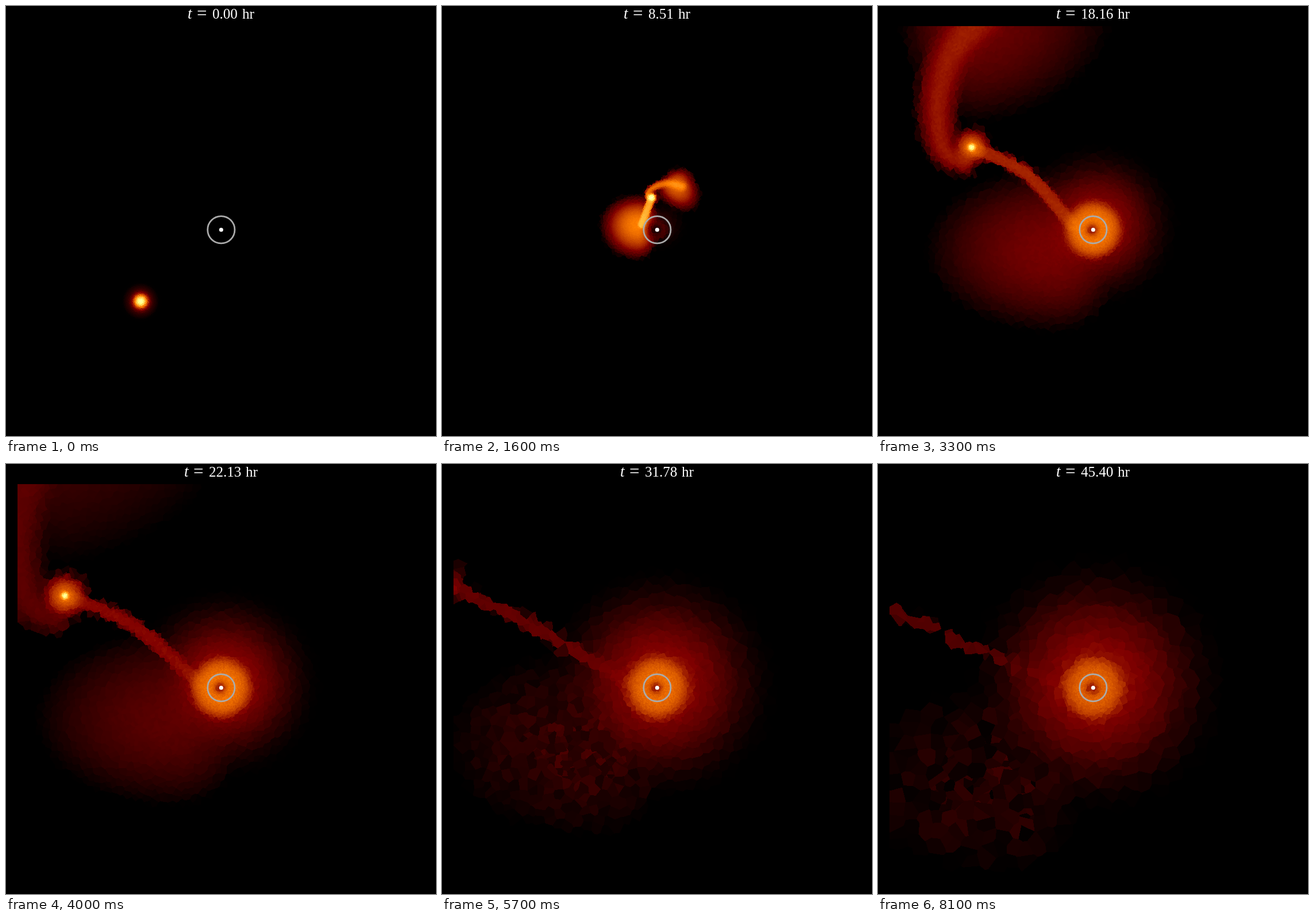
An HTML page with a canvas that plays this animation: 748x748 px, repeating every 8200 ms.

```html
<!DOCTYPE html>
<html>
<head>
<meta charset="utf-8">
<style>
html, body { margin: 0; width: 100%; height: 100%; overflow: hidden; background: #000; }
canvas { display: block; }
</style>
</head>
<body>
<canvas id="stage" width="748" height="748"></canvas>
<script>
const ctx = document.getElementById('stage').getContext('2d');
const SIZE = 708, LEFT = 20, TOP = 35;
const HOLE_X = 374, HOLE_Y = 389, PERI = 23.5;

const mix = (a, b, t) => a + (b - a) * t;
const ramp = (n, from, to) => Math.min(1, Math.max(0, (n - from) / (to - from)));
const decay = (age, span) => Math.exp(-age / span);

let seed = 7;
function random() {
  seed = (Math.imul(seed, 1664525) + 1013904223) >>> 0;
  return seed / 4294967296;
}

// A Voronoi mesh from a jittered grid.
function makeMesh(size) {
  const cols = Math.ceil(SIZE / size), count = cols * cols;
  const x = new Float32Array(count), y = new Float32Array(count), shade = new Float32Array(count);
  for (let i = 0; i < count; i++) {
    x[i] = (i % cols + random()) * size;
    y[i] = (Math.floor(i / cols) + random()) * size;
    shade[i] = random();
  }
  const owner = new Uint32Array(SIZE * SIZE);
  for (let py = 0; py < SIZE; py++) {
    const gy = Math.floor(py / size);
    for (let px = 0; px < SIZE; px++) {
      const gx = Math.floor(px / size);
      let best = Infinity, id = 0;
      for (let j = Math.max(0, gy - 1); j <= gy + 1 && j < cols; j++) {
        for (let i = Math.max(0, gx - 1); i <= gx + 1 && i < cols; i++) {
          const k = j * cols + i, dx = x[k] - px, dy = y[k] - py, d = dx * dx + dy * dy;
          if (d < best) { best = d; id = k; }
        }
      }
      owner[py * SIZE + px] = id;
    }
  }
  return { size, x, y, shade, owner, value: new Float32Array(count) };
}
const meshes = [2, 4, 7, 11, 16, 23].map(makeMesh);

// Parabolic orbit: solve D + D^3 / 3 = M, then add the kick gained near the hole.
function starAt(n) {
  const m = -8.77 + .7346 * n - .002135 * n * n;
  const w = Math.cbrt(1.5 * m + Math.sqrt(2.25 * m * m + 1));
  const d = w - 1 / w;
  return [HOLE_X + PERI * (1 - d * d) - .93 * Math.max(0, n - 15), HOLE_Y - 2 * PERI * d];
}

// Catmull-Rom curve through a few points.
function curve(points) {
  const last = points.length - 1, out = [];
  const get = i => points[Math.min(last, Math.max(0, i))];
  for (let s = 0; s <= last * 4; s++) {
    const i = Math.min(last - 1, Math.floor(s / 4)), t = s / 4 - i;
    out.push([0, 1].map(axis => {
      const [a, b, c, d] = [-1, 0, 1, 2].map(k => get(i + k)[axis]);
      return b + t / 2 * (c - a + t * (2 * a - 5 * b + 4 * c - d + t * (3 * (b - c) + d - a)));
    }));
  }
  return out;
}

// Squared distance to a curve, in units of its local half width, at most 1.
function tubeDistance(x, y, points, w0, w1) {
  let best = 1;
  for (let i = 0; i < points.length - 1; i++) {
    const [ax, ay] = points[i], dx = points[i + 1][0] - ax, dy = points[i + 1][1] - ay;
    const t = Math.min(1, Math.max(0, ((x - ax) * dx + (y - ay) * dy) / (dx * dx + dy * dy + 1e-6)));
    const ex = x - ax - t * dx, ey = y - ay - t * dy;
    const w = mix(w0, w1, (i + t) / (points.length - 1));
    best = Math.min(best, (ex * ex + ey * ey) / (w * w));
  }
  return best;
}

// A soft oval with its own extent to the left, right, top and bottom.
function cloud(dx, dy, l, r, u, d) {
  const a = dx / (dx < 0 ? l : r), b = dy / (dy < 0 ? u : d);
  return Math.max(0, 1 - a * a - b * b);
}

// The tail thrown outwards, in the star's frame; it only turns and grows.
const arm = curve([[-12, 16], [-31, -5], [-28, -55], [-2, -108], [50, -150]]);

// Returns the brightness function of one step.
function makeField(n) {
  const [sx, sy] = starAt(n);
  const age = Math.max(0, n - 15);
  const birth = ramp(n, 10, 15), squeeze = ramp(n, 9, 15), grown = 1 - decay(age, 10);

  const coreR = mix(14, 9, squeeze), glow = mix(.15, .44, squeeze);
  const glowR = mix(32, 14, squeeze) + 42 * (age / 33) ** .75;

  const scale = Math.max(.3, (n - 10) / 14), turn = .5 / scale - .5;
  const cos = Math.cos(turn) / scale, sin = Math.sin(turn) / scale;
  const fade = birth * (1 - ramp(n, 30, 52));
  const armV = .36 * scale ** -.25 * fade, fanV = .28 * scale ** -.45 * fade;

  const debrisX = mix(sx, HOLE_X - 34 - 1.9 * age, birth);
  const debrisY = mix(sy, HOLE_Y - 9 + 2.6 * age, birth);
  const debrisV = birth * (.06 + .44 * decay(age, 18));
  const patch = .9 * ramp(n, 40, 72);

  const haloR = 240 * (1 - decay(Math.max(.1, n - 10), 24)), haloV = .3 * ramp(n, 12, 22);
  const discR = 20 + 50 * grown, discV = ramp(n, 12, 18) * (.5 - .001 * n);
  const young = decay(age, 5), holeR = 10 + 4 * young;
  const depth = ramp(n, 12, 15) * (.4 + .45 * young);

  // Once the star has left, the end of the stream sinks along the border.
  const bend = ramp(n, 12, 24) - ramp(n, 44, 64);
  const from = [Math.max(sx, -10), Math.max(sy, 103 + 1.7 * n)];
  const to = [HOLE_X - 18 - .6 * n, HOLE_Y - 9];
  const middle = [mix(from[0], to[0], .5) + 8 * bend, mix(from[1], to[1], .5) - 22 * bend];
  const stream = curve([n < 48 ? [sx, sy] : from, middle, to]);
  const streamW = mix(9, 17, ramp(n, 15, 24));
  const streamV = ramp(n, 12, 14) * (.15 + .43 * decay(age, 18));
  const grain = .08 * ramp(n, 0, 40);

  return (x, y, shade) => {
    const dx = x - sx, dy = y - sy, hx = x - HOLE_X, hy = y - HOLE_Y;
    const lx = dx * cos + dy * sin, ly = dy * cos - dx * sin;
    const star2 = dx * dx + dy * dy, hole2 = hx * hx + hy * hy;
    let sum = 0;
    const add = v => { sum += v ** 4; };
    add(.82 * Math.exp(-star2 / (coreR * coreR)));
    add(glow * Math.max(0, 1 - star2 / (glowR * glowR)));
    if (fade) {
      add(fanV * cloud(lx - 25, ly + 130, 80, 155, 105, 105));
      add(armV * (1 - tubeDistance(lx, ly, arm, 17, 40)));
    }
    add(debrisV * (1 - patch + 2 * patch * shade) * cloud(x - debrisX, y - debrisY,
      68 + 192 * grown, 42 + 100 * grown, 55 + 110 * grown, 64 + 96 * grown));
    add(haloV * cloud(hx - 6, hy + 8, haloR, haloR, haloR, haloR) ** 2);
    add(discV * Math.max(0, 1 - (hole2 / (discR * discR)) ** 2));
    if (streamV) add(streamV * (1 - tubeDistance(x, y, stream, streamW, streamW) ** 2));
    const hole = depth * Math.exp(-((hx + 2) ** 2 + hy * hy) / (holeR * holeR));
    return Math.sqrt(Math.sqrt(sum)) * (1 - hole) * (1 + grain * (shade - .5));
  };
}

const image = ctx.createImageData(SIZE, SIZE);

function drawGas(n) {
  const field = makeField(n), coarse = 3 + .32 * n, data = image.data;
  let first = meshes.length - 1;
  while (first > 0 && meshes[first].size > coarse) first--;
  for (const mesh of meshes) mesh.value.fill(-1);
  for (let p = 0, o = 0; p < SIZE * SIZE; p++, o += 4) {
    let v = 0;
    // Denser gas takes smaller cells.
    for (let level = first; level >= 0; level--) {
      const mesh = meshes[level], k = mesh.owner[p];
      if (mesh.value[k] < 0) mesh.value[k] = field(mesh.x[k] + LEFT, mesh.y[k] + TOP, mesh.shade[k]);
      v = mesh.value[k];
      if (mesh.size <= coarse * (1 - 2.1 * v)) break;
    }
    data[o] = 510 * v;
    data[o + 1] = 510 * v - 128;
    data[o + 2] = 510 * v - 255;
    data[o + 3] = 255;
  }
  ctx.putImageData(image, LEFT, TOP);
}

function circle(r) {
  ctx.beginPath();
  ctx.arc(HOLE_X + .3, HOLE_Y + .3, r, 0, 2 * Math.PI);
}

function drawTitle(n) {
  const label = (n * .5675 + 1e-6).toFixed(2);
  const half = label.length > 4 ? 64 : 58;
  const write = (text, x, style, y = 22) => {
    ctx.font = style + ' "Liberation Serif", serif';
    ctx.fillText(text, x, y);
  };
  ctx.fillStyle = '#fff';
  write('t', 374 - half, 'italic 27px');
  write('=', 374 - half + 16, '31px', 23);
  write(label, 374 - half + 43, '25px');
  write('hr', 374 + half - 21, '25px');
}

function draw(n) {
  ctx.fillStyle = '#000';
  ctx.fillRect(0, 0, 748, 748);
  drawGas(n);
  ctx.strokeStyle = '#aaa';
  ctx.lineWidth = 2.8;
  circle(23.6);
  ctx.stroke();
  ctx.fillStyle = '#fff';
  circle(3.5);
  ctx.fill();
  drawTitle(n);
}

let shown = -1;
function tick() {
  const step = Math.max(0, Math.floor(performance.now() % 8200 / 100) - 1);
  if (step !== shown) draw(shown = step);
  requestAnimationFrame(tick);
}
tick();
</script>
</body>
</html>
```
